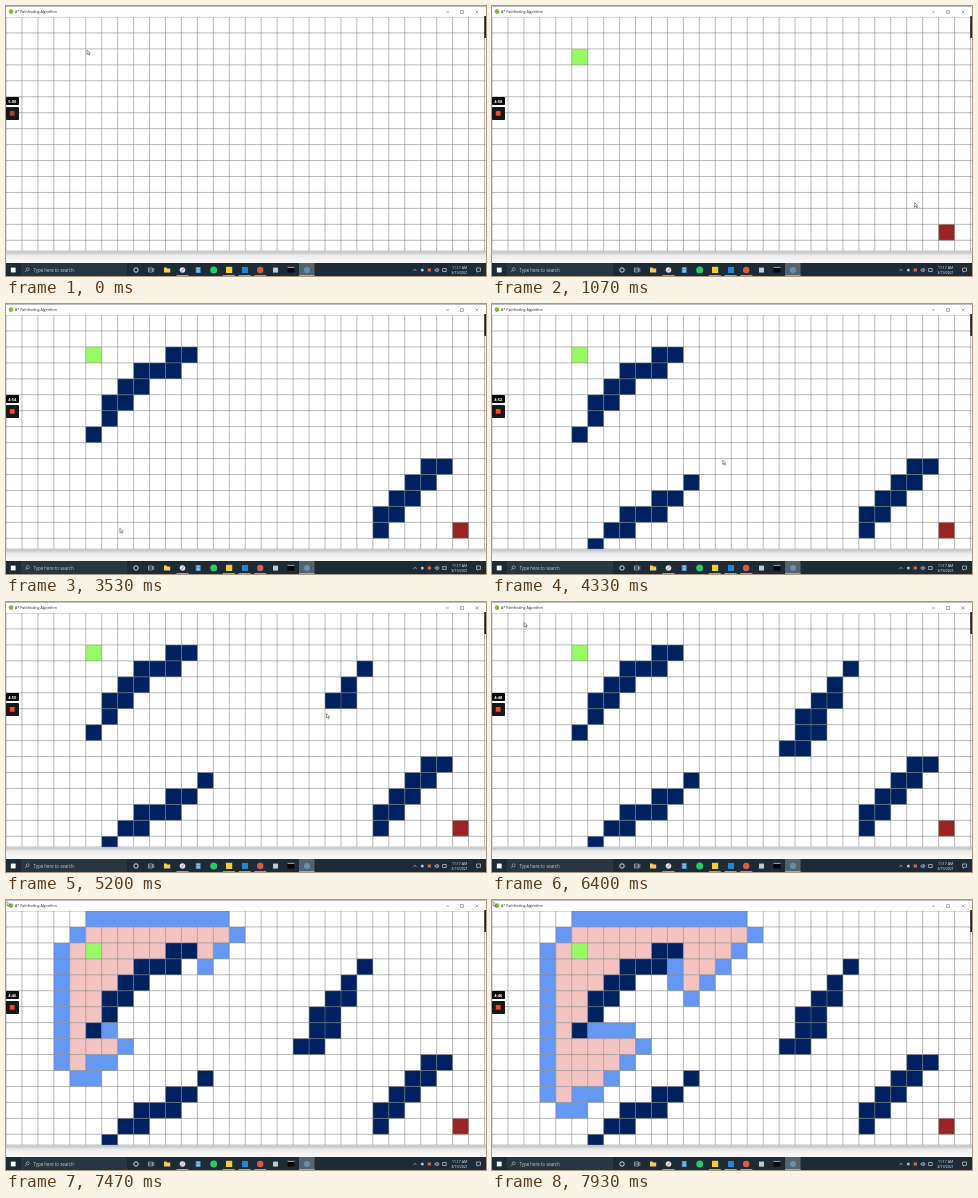
An HTML page that plays this animation: 480x270 px, repeating every 8000 ms.

```html
<!DOCTYPE html>
<html lang="en">
<head>
<meta charset="utf-8">
<title>Pathfinding</title>
<style>
html, body { margin: 0; width: 100%; height: 100%; overflow: hidden; background: #fff; }
svg { display: block; width: 100vw; height: 100vh; font-family: "Open Sans", "Noto Sans", sans-serif; }
</style>
</head>
<body>
<svg id="stage" viewBox="0 0 480 270">
  <defs>
    <linearGradient id="shade" x2="0" y2="1">
      <stop offset="0" stop-color="#bcbcbc"/>
      <stop offset=".35" stop-color="#ececec"/>
      <stop offset="1" stop-color="#fafafa"/>
    </linearGradient>
    <clipPath id="board"><rect y="11" width="480" height="234.3"/></clipPath>
  </defs>
  <rect width="480" height="270" fill="#fff"/>
  <g clip-path="url(#board)">
    <g id="cells"></g>
    <path id="lines" fill="none" stroke="#808080" stroke-opacity=".62" stroke-width=".9"/>
  </g>
  <rect y="245.3" width="480" height="12" fill="url(#shade)"/>

  <g id="titlebar">
    <rect width="480" height="10.6" fill="#fff"/>
    <path d="M0 .3H480" stroke="#777" stroke-width=".6"/>
    <circle cx="5" cy="5.6" r="2.3" fill="#86b53c"/>
    <text x="9" y="7.1" font-size="3.6" fill="#222">A* Pathfinding Algorithm</text>
    <path d="M440 6h3M454.600 4.600h2.800v2.800h-2.800zM469.600 4.500l2.800 2.800m0-2.800l-2.800 2.800" fill="none" stroke="#555" stroke-width=".5"/>
    <rect x="478.300" y="10" width="1.700" height="22" fill="#222"/>
  </g>

  <g id="recorder">
    <rect y="91" width="13" height="8" rx=".8" fill="#090909"/>
    <text id="clock" x="6.300" y="96.500" font-size="4" font-weight="700" fill="#fff" text-anchor="middle"></text>
    <rect y="101" width="13" height="13" rx=".8" fill="#1c1716"/>
    <rect id="stop" x="3.800" y="105" width="4.800" height="4.800" rx=".6"/>
  </g>

  <g id="taskbar">
    <rect y="257" width="480" height="13" fill="#1d2b36"/>
    <rect x="15" y="257" width="106" height="13" fill="#28363f"/>
    <rect x="4.800" y="261.600" width="4.800" height="4.800" fill="#fff"/>
    <circle cx="21.700" cy="263.300" r="1.500" fill="none" stroke="#ddd" stroke-width=".5"/>
    <path d="M20.600 264.500l-1.400 1.500" stroke="#ddd" stroke-width=".5"/>
    <text x="27.500" y="265.600" font-size="4.400" fill="#c4cacd">Type here to search</text>
    <circle cx="130" cy="264" r="2.200" fill="none" stroke="#fff" stroke-width=".8"/>
    <path d="M142.500 262h4v4h-4zM147.800 262v4M142.500 264h4" fill="none" stroke="#cbd3d6" stroke-width=".6"/>
    <path d="M158 261.500h2.500l.8 1h2.900v4H158z" fill="#f4cb5c"/>
    <circle cx="176.500" cy="264" r="2.800" fill="#dfe5ec"/>
    <path d="M174.800 265.800l3.600-3.600" stroke="#c4504e" stroke-width=".8"/>
    <rect x="189.700" y="261" width="5" height="6" fill="#3d86bd"/>
    <path d="M190.600 262.300h3.200M190.600 264.200h3.200M190.600 265.800h3.200" stroke="#e8f2f8" stroke-width=".7"/>
    <circle cx="207.700" cy="264" r="3.500" fill="#2bc866"/>
    <rect x="220" y="260.800" width="6.200" height="6.200" fill="#f7cb32"/>
    <rect x="236" y="261" width="6" height="6" fill="#2486d2"/>
    <circle cx="254.200" cy="264" r="3.200" fill="#df5a45"/>
    <rect x="267" y="261.600" width="5" height="5" fill="#c9c9c4"/>
    <rect x="281.500" y="261" width="7" height="5.600" fill="#070707"/>
    <path d="M281.500 261.400h7" stroke="#c9d0d4" stroke-width=".8"/>
    <rect x="293" y="257" width="15.500" height="13" fill="#55636d"/>
    <circle cx="301" cy="264" r="3" fill="#658fb2"/>
    <path d="M170.500 269.500h12M216.800 269.500h12M232.600 269.500h12M248.300 269.500h12M293 269.500h15.500" stroke="#b8a1c4" stroke-width=".9"/>
    <g fill="none" stroke="#e2e6e8" stroke-width=".6">
      <path d="M407.500 264.800l1.500-1.500 1.500 1.500M429 263.300h1l1.300-1v3.600l-1.300-1h-1zM432.400 262.600q1 1.400 0 2.800M436.600 262.500h3.600v3h-3.600z"/>
      <path d="M470.500 262h4v3.300h-2l-1 1v-1h-1z"/>
    </g>
    <circle cx="416.300" cy="264" r="1.500" fill="#a8c4d4"/>
    <rect x="421.600" y="262.500" width="3.400" height="3" fill="#d5605e"/>
    <g font-size="3.500" fill="#eef0f1" text-anchor="middle">
      <text x="453.500" y="262.700">11:17 AM</text>
      <text x="453.500" y="268">3/19/2021</text>
    </g>
  </g>
  <path id="cursor" d="M0 0V4.400L1.100 3.500 1.900 5.100 2.600 4.800 1.900 3.200H3.200Z" fill="#fff" stroke="#222" stroke-width=".45"/>
</svg>
<script>
const LOOP = 8000, COLS = 30, ROWS = 15, SIZE = 15.95, TOP = 11;
const START = { col: 5, row: 2, at: 110 }, END = { col: 28, row: 13, at: 800 };
const SEARCH_AT = 6521, STEP_MS = 29;
const COLOR = { start: '#97fb64', end: '#9a2424', wall: '#002160', open: '#6597f4', closed: '#f3c3c1' };
const $ = id => document.getElementById(id);
const key = (col, row) => row * COLS + col;

// Each stroke: first moment, pause per cell, then "col,row" cells.
const strokes = [
  [1400, 75, '27,9 26,9 26,10 25,10 25,11 24,11 24,12 23,12 23,13'],
  [2520, 55, '5,7 6,6 6,5 7,5 7,4 8,4 8,3 9,3 10,3 10,2 11,2'],
  [3620, 75, '6,14 7,13 8,13 8,12 9,12 10,12 10,11 11,11 12,10'],
  [4780, 110, '22,3 21,4 21,5 20,5 20,6 19,6 20,7 19,7 19,8 18,8']
];
const wallAt = new Map();
for (const [at, gap, list] of strokes) {
  list.split(' ').forEach((cell, i) => wallAt.set(key(...cell.split(',').map(Number)), at + i * gap));
}

// Pointer stops: time, x, y.
const stops = [
  [0, 81, 44], [150, 82, 45], [780, 455, 225], [880, 454, 224], [1070, 422.500, 197],
  [1200, 438, 161], [1400, 438, 161], [2000, 375, 227], [2400, 124, 119.500],
  [2520, 88, 131], [3070, 183, 50], [3530, 114, 224], [3620, 105, 240],
  [4220, 199, 178], [4780, 359, 67], [5200, 320.500, 111.500], [5770, 295, 146],
  [6270, 84, 52], [6480, 1, 1.500], [8000, 1, 1.500]
];

// A* with Manhattan distance; returns the step at which cells open and close.
function search() {
  const opened = new Map(), closed = new Map(), cost = new Map([[key(START.col, START.row), 0]]);
  const dist = (c, r) => Math.abs(END.col - c) + Math.abs(END.row - r);
  const queue = [{ c: START.col, r: START.row, f: 0, n: 0 }];
  let count = 0, step = 0;
  while (queue.length) {
    queue.sort((a, b) => a.f - b.f || a.n - b.n);
    const { c, r } = queue.shift(), here = key(c, r);
    if (c === END.col && r === END.row) break;
    step++;
    for (const [dc, dr] of [[1, 0], [-1, 0], [0, 1], [0, -1]]) {
      const x = c + dc, y = r + dr, k = key(x, y), g = cost.get(here) + 1;
      if (x < 0 || y < 0 || x >= COLS || y >= ROWS || wallAt.has(k)) continue;
      if (g >= (cost.get(k) ?? Infinity)) continue;
      cost.set(k, g);
      opened.set(k, step);
      queue.push({ c: x, r: y, f: g + dist(x, y), n: ++count });
    }
    closed.set(here, step);
  }
  return { opened, closed };
}
const { opened, closed } = search();

const cells = [];
for (let row = 0; row < ROWS; row++) {
  for (let col = 0; col < COLS; col++) {
    const rect = document.createElementNS('http://www.w3.org/2000/svg', 'rect');
    const attrs = { x: col * SIZE, y: TOP + row * SIZE, width: SIZE + .05, height: SIZE + .05, fill: 'none' };
    for (const name in attrs) rect.setAttribute(name, attrs[name]);
    $('cells').append(rect);
    cells.push(rect);
  }
}

let grid = '';
for (let i = 0; i <= COLS; i++) grid += `M${i * SIZE} ${TOP}V245.3`;
for (let i = 0; i < ROWS; i++) grid += `M0 ${TOP + i * SIZE}H480`;
$('lines').setAttribute('d', grid + 'M0 245.1H480');

function cellColor(k, t, step) {
  if (k === key(START.col, START.row)) return t >= START.at ? COLOR.start : 'none';
  if (k === key(END.col, END.row)) return t >= END.at ? COLOR.end : 'none';
  if (wallAt.has(k)) return t >= wallAt.get(k) ? COLOR.wall : 'none';
  if (closed.get(k) < step) return COLOR.closed;
  return opened.get(k) <= step ? COLOR.open : 'none';
}

function pointer(t) {
  const i = stops.findIndex(s => s[0] > t);
  const [t0, x0, y0] = stops[i - 1], [t1, x1, y1] = stops[i];
  const p = (t - t0) / (t1 - t0);
  return [x0 + (x1 - x0) * p, y0 + (y1 - y0) * p];
}

function draw(t) {
  const step = Math.floor((t - SEARCH_AT) / STEP_MS) + 1;
  cells.forEach((rect, k) => rect.setAttribute('fill', cellColor(k, t, step)));
  $('cursor').setAttribute('transform', `translate(${pointer(t)})`);
  const left = 300 - Math.floor(t * .00182 + .55);
  $('clock').textContent = Math.floor(left / 60) + ':' + String(left % 60).padStart(2, '0');
  $('stop').setAttribute('fill', t < 300 ? '#a5403a' : '#f04a2b');
}

const began = performance.now();
function tick() {
  draw((performance.now() - began) % LOOP);
  requestAnimationFrame(tick);
}
tick();
</script>
</body>
</html>
```
